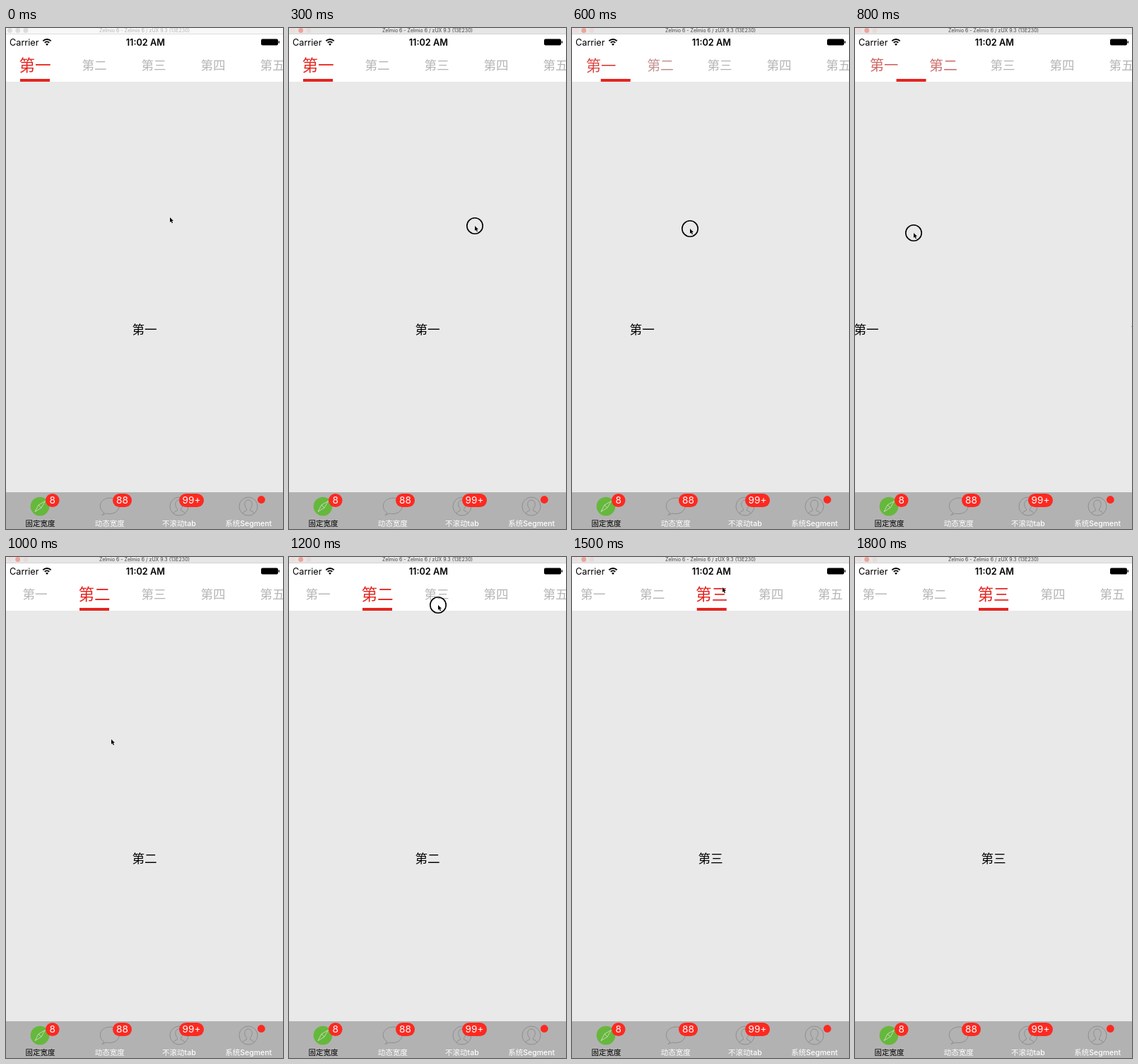
Write an HTML page with a canvas that moves like this. It is 392x709 px and loops after 2000 ms.

```html
<!DOCTYPE html>
<html lang="zh-CN">
<head>
<meta charset="utf-8">
<title>Tabs</title>
<style>
  html, body { margin: 0; height: 100%; overflow: hidden; }
  canvas { display: block; width: 392px; height: 709px; }
</style>
</head>
<body>
<canvas id="stage" width="392" height="709"></canvas>
<script>
const c = document.getElementById('stage').getContext('2d');
const W = 392, STEP = 100, LOOP = 2000, TAB = 84;
const names = ['第一', '第二', '第三', '第四', '第五'];
const RED = '#e5241f', BADGE = '#fd2920', LINE = '#8f8f8f';
const FONT = 'Inter, "Noto Sans CJK SC", "Noto Sans CJK", sans-serif';

// Keys are [step, value, ...], interpolated linearly
const pointer = [[0, 232, 268], [1, 236, 269], [3, 263, 280], [4, 260, 281], [5, 224, 282],
  [6, 167, 284], [8, 83, 290], [9, 112, 276], [10, 149, 258], [11, 180, 165],
  [12, 211, 68], [13, 212, 64], [14, 212, 62], [16, 214, 24]];
const pageKeys = [[4, 0], [5, .09], [6, .247], [8, .459], [9, .88], [10, 1]];
const scrollKeys = [[12, 0], [13, 1.7], [14, 6.5], [15, 11.3], [16, 13]];

function sample(keys, s) {
  const i = keys.findIndex(k => k[0] >= s);
  if (i < 0) return keys[keys.length - 1].slice(1);
  if (i === 0) return keys[0].slice(1);
  const a = keys[i - 1], b = keys[i], f = (s - a[0]) / (b[0] - a[0]);
  return a.slice(1).map((v, j) => v + (b[j + 1] - v) * f);
}

function rect(x, y, w, h, color) {
  c.fillStyle = color;
  c.fillRect(x, y, w, h);
}

function pill(x, y, w, h, r, color) {
  c.fillStyle = color;
  c.beginPath();
  c.roundRect(x, y, w, h, r);
  c.fill();
}

function disc(x, y, r, color) {
  c.fillStyle = color;
  c.beginPath();
  c.arc(x, y, r, 0, 7);
  c.fill();
}

function text(str, x, y, size, color, weight = 400, align = 'center') {
  c.font = `${weight} ${size}px ${FONT}`;
  c.textAlign = align;
  c.fillStyle = color;
  c.fillText(str, x, y + size * .37);
}

function outline(d, color = LINE, width = 1) {
  c.strokeStyle = color;
  c.lineWidth = width;
  c.stroke(new Path2D(d));
}

function titleBar(active) {
  rect(0, 0, W, 9, active ? '#e6e6e6' : '#f7f7f7');
  rect(0, 8, W, 1, active ? '#d4d4d4' : '#dedede');
  const lights = active ? ['#f0dcda', '#eea39b', '#e9d9d7'] : ['#dcdcdc', '#dcdcdc', '#dcdcdc'];
  lights.forEach((color, i) => disc(5.5 + i * 11.2, 3.5, 3.4, color));
  text('Zelmio 6 - Zelmio 6 / zUX 9.3 (13E230)', 196, 3.7, 7, active ? '#444' : '#b4b4b4');
}

function statusBar() {
  text('Carrier', 5, 20, 12.7, '#000', 400, 'left');
  text('11:02 AM', 197.3, 20, 12.7, '#000', 600);
  c.strokeStyle = '#000';
  c.lineWidth = 1.8;
  for (const r of [4.6, 8]) {
    c.beginPath();
    c.arc(58, 24, r, -Math.PI * .75, -Math.PI * .25);
    c.stroke();
  }
  c.fillStyle = '#000';
  c.fill(new Path2D('M58 25L56 22.8Q58 21.2 60 22.8Z'));
  pill(361, 15.5, 24, 9, 2, '#000');
  pill(385.6, 18.3, 1.4, 3.4, .7, '#000');
}

function tabs(page, scroll) {
  const mix = (a, b, f) => Math.round(a + (b - a) * f);
  names.forEach((name, i) => {
    const f = Math.max(0, 1 - Math.abs(page - i));
    const color = `rgb(${mix(182, 229, f)},${mix(182, 36, f)},${mix(182, 31, f)})`;
    text(name, 41 + i * TAB - scroll, 52.8, 17.6 + 5 * f, color, 300);
  });
  rect(20 + page * TAB - scroll, 72, 42, 4, RED);
}

function badge(str, x, w) {
  pill(x, 659, w, 19, 9.5, BADGE);
  text(str, x + w / 2, 668.3, 13.6, '#fff');
}

function person(x) {
  c.save();
  c.translate(x, 677);
  outline('M13 0A13 13 0 1 1-13 0A13 13 0 1 1 13 0Z' +
    'M-8 10Q-7 7-2.5 5.8V3.5C-7-1-6-9 0-9S7-1 2.5 3.5V5.8Q7 7 8 10');
  c.restore();
}

function bottomBar() {
  rect(0, 657, W, 52, '#b2b2b2');
  disc(48, 677, 13.3, '#66b83c');
  outline('M55.5 669.5L50 679L41 684.5L46 675ZM46 675L50 679', '#c3dab8');
  outline('M139 686C130 681 131 666 147 665C164 665 165 687 147 687.5Q144 687.5 141.5 687L136 689.5Z');
  person(245);
  person(343);
  badge('8', 56, 19.5);
  badge('88', 151, 27);
  badge('99+', 245, 35);
  disc(361.3, 667.5, 5.4, BADGE);
  ['固定宽度', '动态宽度', '不滚动tab', '系统Segment'].forEach((label, i) =>
    text(label, 48.5 + i * 98.2, 701.2, 10.5, i ? '#fff' : '#000', 500));
}

function cursor(x, y, pressed) {
  if (pressed) {
    c.strokeStyle = '#000';
    c.lineWidth = 1.6;
    c.beginPath();
    c.arc(x, y, 11.2, 0, 7);
    c.stroke();
  }
  c.save();
  c.translate(x, y);
  const arrow = new Path2D('M0 0V7L1.6 5.6L2.8 8.3L4 7.8L2.9 5.1H5Z');
  c.strokeStyle = '#fff';
  c.lineWidth = .6;
  c.stroke(arrow);
  c.fillStyle = '#000';
  c.fill(arrow);
  c.restore();
}

function draw(now) {
  const s = Math.min(18, Math.floor(now % LOOP / STEP));
  const page = s >= 13 ? 2 : sample(pageKeys, s)[0];
  rect(0, 0, W, 709, '#e9e9e9');
  rect(0, 9, W, 67, '#fff');
  titleBar(s > 0);
  statusBar();
  tabs(page, sample(scrollKeys, s)[0]);
  names.forEach((name, i) => text(name, 196 + (i - page) * W, 426.2, 17.6, '#000', 300));
  bottomBar();
  if (s < 17) cursor(...sample(pointer, s), s >= 3 && s <= 8 || s === 12);
}

const start = performance.now();
function tick() {
  draw(performance.now() - start);
  requestAnimationFrame(tick);
}
tick();
</script>
</body>
</html>
```
